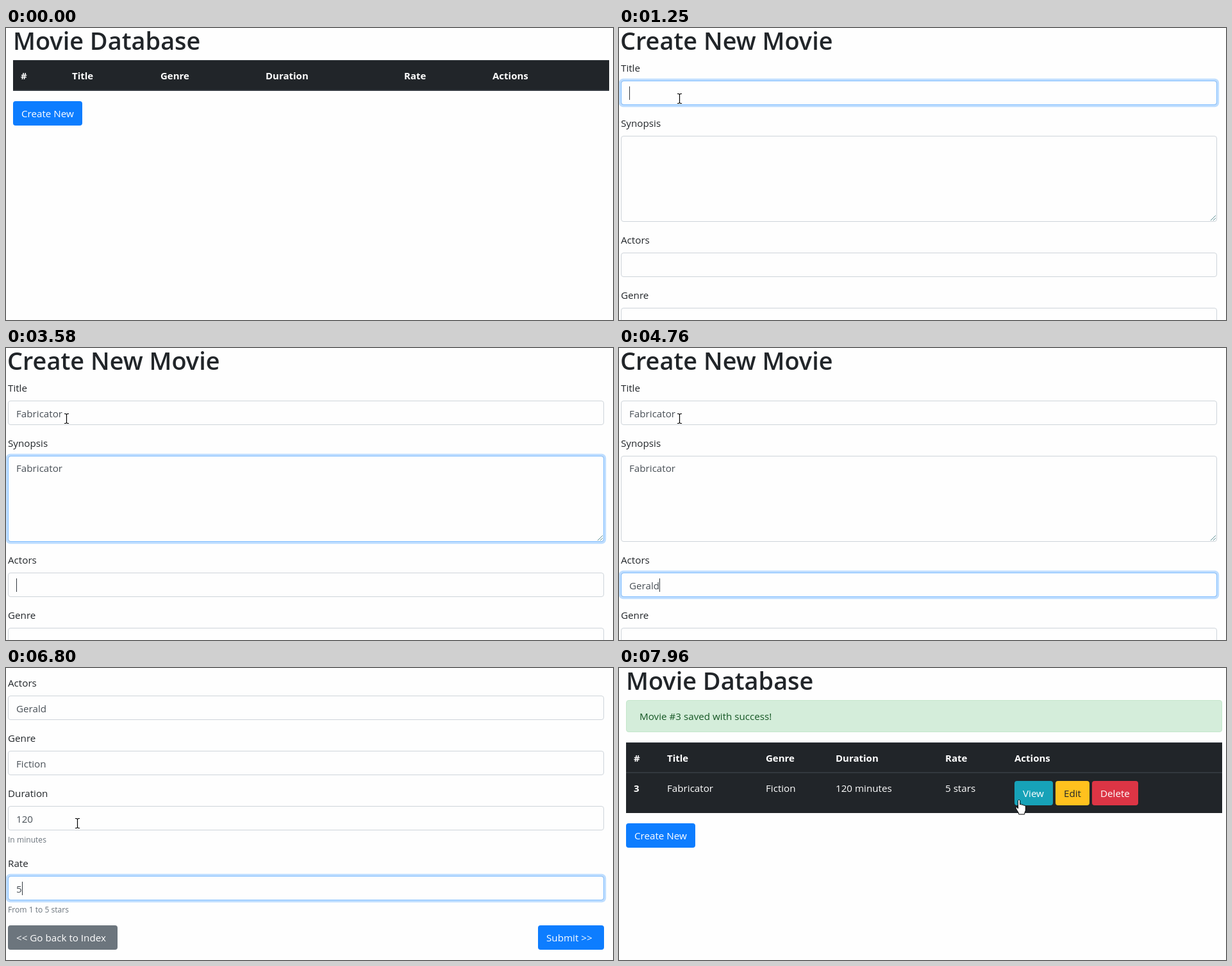
Animation of 947 by 455 pixels, one loop 8 s. Source, as an HTML page:

```html
<!DOCTYPE html>
<html lang="en">
<head>
<meta charset="utf-8">
<title>Movie Database</title>
<style>
  html, body { margin: 0; width: 100%; height: 100%; overflow: hidden; background: #fefefe; }
  svg { display: block; width: 947px; height: 455px; }
  text { font: 15.2px "Open Sans", "Noto Sans", sans-serif; fill: #212529; white-space: pre; }
  text.h1 { font-size: 37.9px; font-weight: 600; }
  text.b { font-size: 15px; font-weight: 700; }
  text.w { fill: #fff; }
  text.value { fill: #495057; }
  text.small { font-size: 12.1px; fill: #6c757d; }
  text.ok { fill: #155724; }
</style>
</head>
<body>
<svg id="stage" viewBox="0 0 947 455" xmlns="http://www.w3.org/2000/svg"></svg>
<script>
const LOOP = 8000, STEP = 80;
const FILM = 'Fabricator', ACTOR = 'Gerald';
const stage = document.getElementById('stage');
const $ = id => document.getElementById(id);

// Markup helpers
const esc = s => s.replace(/</g, '&lt;').replace(/>/g, '&gt;');
const text = (x, y, s, cls = '', id = '') => `<text id="${id}" class="${cls}" x="${x}" y="${y}">${esc(s)}</text>`;
const rect = (x, y, w, h, fill, r = 0, more = '') =>
  `<rect x="${x}" y="${y}" width="${w}" height="${h}" rx="${r}" fill="${fill}" ${more}/>`;
const ring = (x, y, w, h, color, id) =>
  rect(x - 3.2, y - 3.2, w + 6.4, h + 6.4, color, 7, `id="${id}" opacity="0"`);
const button = (x, y, w, fill, label, cls = 'w', id = '') =>
  rect(x, y, w, 38, fill, 4, `id="${id}"`) + text(x + 13, y + 25, label, cls);
const row = (xs, labels, y, cls) => labels.map((s, i) => text(xs[i], y, s, cls)).join('');

// Form fields: label, top, height, focus and blur times, typed steps
const letters = (word, times) => times.map((t, i) => [t, word.slice(0, i + 1)]);
const fields = [
  { label: 'Title', y: 82, h: 38, on: 1020, off: 2890,
    typed: letters(FILM, [1320, 1440, 1560, 1690, 1810, 1930, 2060, 2180, 2420, 2560]) },
  { label: 'Synopsis', y: 168, h: 134, on: 2890, off: 3580, typed: [[3350, FILM]] },
  { label: 'Actors', y: 350, h: 38, on: 3580, off: 4840,
    typed: [[4150, ACTOR.slice(0, 3)], [4690, ACTOR.slice(0, 5)], [4760, ACTOR]] },
  { label: 'Genre', y: 436, h: 38, on: 4840, off: 5400, typed: [[5160, 'Fiction']] },
  { label: 'Duration', y: 522, h: 38, on: 5400, off: 6400, hint: 'In minutes',
    typed: letters('120', [5790, 6030, 6180]) },
  { label: 'Rate', y: 631, h: 38, on: 6400, off: 7400, hint: 'From 1 to 5 stars', typed: [[6640, '5']] }
];

const fieldMarkup = (f, i) => {
  const base = f.y + (f.h > 38 ? 25 : 26);
  f.caretY = base - 17;
  return text(3, f.y - 14, f.label) +
    ring(3, f.y, 930, f.h, '#bfdeff', 'ring' + i) +
    rect(3.5, f.y + .5, 929, f.h - 1, '#fefefe', 3.5, 'stroke="#ced4da"') +
    rect(3.5, f.y + .5, 929, f.h - 1, 'none', 3.5, `id="edge${i}" stroke="#80bdff" opacity="0"`) +
    text(16, base, '', 'value', 'value' + i) +
    (f.hint ? text(3, f.y + 57, f.hint, 'small') : '');
};

const heads = ['#', 'Title', 'Genre', 'Duration', 'Rate', 'Actions'];
const wide = [23, 103, 241, 405, 621, 759], tight = [23, 75, 229, 338, 509, 617];
const tableTop = (y, h) => rect(11, y, 930, h, '#212529') +
  rect(11, y, 930, 1, '#32383e') + rect(11, y + 46, 930, 2, '#32383e');

stage.innerHTML =
  `<g id="home">${text(11, 34, 'Movie Database', 'h1')}${tableTop(50, 48)}${row(wide, heads, 80, 'b w')}
    ${ring(11, 114, 108, 38, '#80bdff', 'newRing')}
    ${button(11, 114, 108, '#0d7dff', 'Create New', 'w', 'newBtn')}</g>
  <g id="form">${text(2, 34, 'Create New Movie', 'h1')}${fields.map(fieldMarkup).join('')}
    <path d="M923 300l8-8M927 300l4-4" stroke="#5b8f95" fill="none"/>
    ${button(3, 708, 171, '#6c757d', '<< Go back to Index')}
    ${ring(830, 708, 103, 38, '#92c6ff', 'sendRing')}
    ${button(830, 708, 103, '#0d7dff', 'Submit >>', 'w', 'sendBtn')}
    <rect id="caret" width="1" height="21" fill="#333a40"/></g>
  <g id="list">${text(11, 34, 'Movie Database', 'h1')}
    ${rect(11.5, 50.5, 929, 49, '#d4edda', 3.5, 'stroke="#c3e6cb"')}
    ${text(32, 81, 'Movie #3 saved with success!', 'ok')}
    ${tableTop(116, 110)}${row(tight, heads, 146, 'b w')}${text(23, 193, '3', 'b w')}
    ${row(tight.slice(1), [FILM, 'Fiction', '120 minutes', '5 stars'], 193, 'w')}
    ${button(617, 176, 60, '#17a2b8', 'View')}
    ${button(681, 176, 53, '#ffc11e', 'Edit', '')}
    ${button(738, 176, 72, '#dc3545', 'Delete')}
    ${button(11, 242, 108, '#0d7dff', 'Create New')}</g>
  <g id="mouse">
    <path id="arrow" d="M0 0V16.5L3.8 13L6.4 19L9 17.9L6.4 12H11.6Z" fill="#fff" stroke="#000"/>
    <path id="beam" d="M-3 -7.5H-1L.5 -6.5L2 -7.5H4M.5 -6.5V6.5M-3 7.5H-1L.5 6.5L2 7.5H4" fill="none" stroke="#000" stroke-width="1.2"/>
    <path id="hand" d="M-1.5 1C-1.5 -1 1.7 -1 1.7 1V7C2 5.7 4.7 5.9 4.7 7.6C5.2 6.5 7.6 6.9 7.6 8.5C8.3 7.6 10.4 8 10.4 10V15C10.4 17.5 8.6 18.5 8.6 22H-.2C-.2 19 -3 17 -4.8 12.6C-5.4 11 -3.3 10.2 -2.5 11.5L-1.5 13Z" fill="#fff" stroke="#000" stroke-linejoin="round"/>
  </g>`;

// Pointer path: time, x, y, shape from then on
const path = [
  [160, 170, 450, 'arrow'], [480, 94, 134, 'hand'], [640, 94, 134, 'arrow'],
  [720, 94, 134, 'arrow'], [880, 94, 110, 'beam'], [5200, 94, 110, 'beam'],
  [5360, 111, 242, 'beam'], [6880, 111, 242, 'arrow'], [7280, 907, 426, 'hand'],
  [7600, 907, 426, 'arrow'], [7920, 624, 206, 'hand']
];

const clamp = v => Math.max(0, Math.min(1, v));
const ease = v => { v = clamp(v); return v * v * (3 - 2 * v); };
const fade = (t, from) => ease((t - from) / 150);
const show = (id, on) => $(id).setAttribute('display', on ? 'inline' : 'none');
const set = (id, name, v) => $(id).setAttribute(name, v);
const mix = (a, b, k) => `rgb(${a.map((v, i) => Math.round(v + (b[i] - v) * k))})`;
const blue = [13, 125, 255], deep = [6, 101, 212];

function drawMouse(t) {
  const q = Math.floor(t / STEP) * STEP;
  const i = path.findLastIndex(p => p[0] <= q);
  show('mouse', i >= 0);
  if (i < 0) return;
  const a = path[i], b = path[i + 1] || a;
  const k = a === b ? 0 : ease((q - a[0]) / (b[0] - a[0]));
  const x = a[1] + (b[1] - a[1]) * k, y = a[2] + (b[2] - a[2]) * k;
  set('mouse', 'transform', `translate(${Math.round(x)} ${Math.round(y)})`);
  for (const s of ['arrow', 'beam', 'hand']) show(s, s === a[3]);
}

function drawForm(t) {
  const scroll = t < 4840 ? 0 : t < 5240 ? 227 : 307;
  set('form', 'transform', `translate(0 ${-scroll})`);
  show('caret', false);
  fields.forEach((f, i) => {
    const glow = fade(t, f.on) - fade(t, f.off);
    set('ring' + i, 'opacity', glow);
    set('edge' + i, 'opacity', glow);
    const last = f.typed.filter(s => s[0] <= t).pop();
    const value = $('value' + i);
    value.textContent = last ? last[1] : '';
    if (t >= f.on && t < f.off) {
      show('caret', true);
      set('caret', 'x', Math.round(16 + (last ? value.getComputedTextLength() : 0)));
      set('caret', 'y', f.caretY);
    }
  });
  set('sendBtn', 'fill', mix(blue, deep, fade(t, 7260)));
  set('sendRing', 'opacity', fade(t, 7400));
}

function draw(t) {
  const page = t < 640 ? 'home' : t < 7650 ? 'form' : 'list';
  for (const p of ['home', 'form', 'list']) show(p, p === page);
  if (page === 'home') {
    set('newBtn', 'fill', mix(blue, deep, fade(t, 440)));
    set('newRing', 'opacity', fade(t, 540));
  }
  if (page === 'form') drawForm(t);
  drawMouse(t);
}

const start = performance.now();
function tick() {
  draw((performance.now() - start) % LOOP);
  requestAnimationFrame(tick);
}
tick();
</script>
</body>
</html>
```
